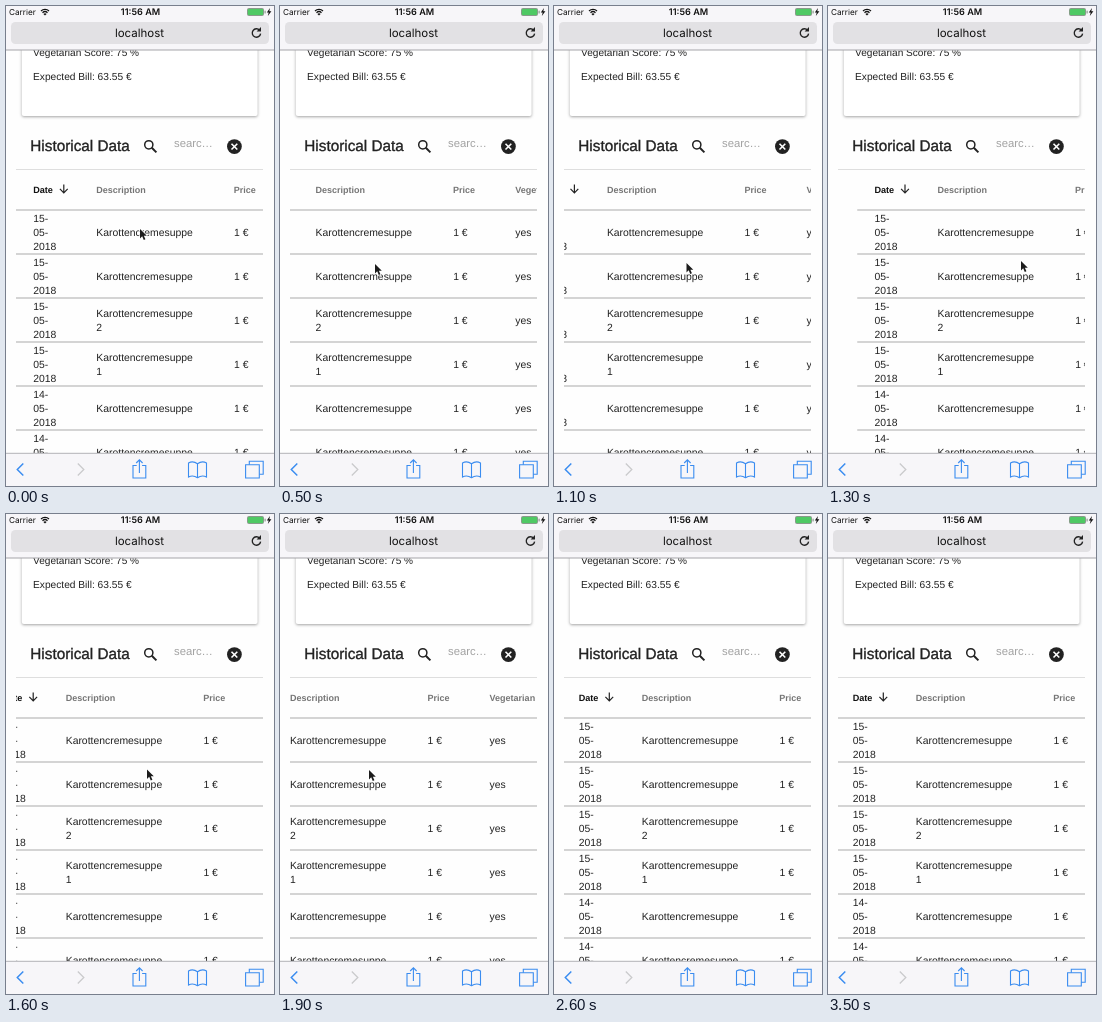
Write an HTML page with a canvas that moves like this. It is 268 px wide and 480 px high and loops after 3600 ms.

```html
<!DOCTYPE html>
<html lang="en">
<head>
<meta charset="utf-8">
<title>Scrolling table</title>
<style>
html, body { margin: 0; width: 100%; height: 100%; overflow: hidden; background: #fff; }
canvas { display: block; width: 100vw; height: 100vh; }
</style>
</head>
<body>
<canvas id="stage"></canvas>
<script>
const W = 268, H = 480, LOOP = 3600, STEP = 100;
const SANS = '"Liberation Sans", Arial, sans-serif';
const UI = 'Inter, Roboto, sans-serif';
const BLUE = '#3a8cf0', INK = '#222', BAR = '#f7f6f9';
const canvas = document.getElementById('stage');
const ctx = canvas.getContext('2d');
const dpr = window.devicePixelRatio || 1;
canvas.width = W * dpr;
canvas.height = H * dpr;
ctx.textRendering = 'geometricPrecision';

// Keys: time followed by values
const scrollKeys = [[0, 0], [900, -94], [1300, 19.2], [1900, -80.4], [2600, -2.5]];
const pointerKeys = [
  [0, 134, 223], [200, 138, 252], [500, 95, 258], [900, 72, 259],
  [1300, 193, 255], [1900, 89, 256], [2300, 168, 254], [2500, 285, 250]
];
const rows = [['15', ''], ['15', ''], ['15', '2'], ['15', '1'], ['14', ''], ['14', '']];

function at(keys, t) {
  const last = keys[keys.length - 1];
  if (t >= last[0]) return last.slice(1);
  const i = keys.findIndex(k => k[0] > t);
  const a = keys[i - 1], b = keys[i];
  const u = (t - a[0]) / (b[0] - a[0]);
  const e = u * u * (3 - 2 * u);
  return a.slice(1).map((v, n) => v + (b[n + 1] - v) * e);
}

function text(str, x, y, size, color = INK, weight = 400, family = SANS, align = 'left') {
  ctx.font = `${weight} ${size}px ${family}`;
  ctx.textAlign = align;
  ctx.fillStyle = color;
  ctx.fillText(str, x, y);
}

function rect(x, y, w, h, color) {
  ctx.fillStyle = color;
  ctx.fillRect(x, y, w, h);
}

function round(x, y, w, h, r, color) {
  ctx.beginPath();
  ctx.roundRect(x, y, w, h, r);
  ctx.fillStyle = color;
  ctx.fill();
}

function line(path, color, width = 1) {
  ctx.strokeStyle = color;
  ctx.lineWidth = width;
  ctx.stroke(new Path2D(path));
}

function shape(path, color) {
  ctx.fillStyle = color;
  ctx.fill(new Path2D(path));
}

function statusBar() {
  rect(0, 0, W, 44, BAR);
  rect(0, 43.5, W, 1, '#a6a6a9');
  text('Carrier', 3, 9, 8.2, '#111', 400, UI);
  shape('M39 9.6 L37.4 7.9 A2.3 2.3 0 0 1 40.6 7.9 Z', '#111');
  line('M36.5 6.7 A3.6 3.6 0 0 1 41.5 6.7 M35 5 A5.7 5.7 0 0 1 43 5', '#111', 1.2);
  text('11:56 AM', 134.5, 9.2, 9.1, '#111', 600, UI, 'center');
  round(241, 2, 17, 8, 2, '#8a9a8c');
  round(241.9, 2.9, 15.2, 6.2, 1.2, '#4fc964');
  round(258.5, 4.5, 1.2, 3, 0.6, '#8a9a8c');
  shape('M264 2 L260.8 6.5 H262.7 L261.8 10 L265.4 5.3 H263.3 Z', '#111');
  round(5, 16, 258, 22, 4.5, '#e2e1e4');
  text('localhost', 133.5, 31, 11.5, '#111', 400, UI, 'center');
  line('M253.6 24.2 A4.2 4.2 0 1 0 254.6 27.6', INK, 1.4);
  shape('M250.6 25.4 H255 V21 Z', INK);
}

function card() {
  ctx.save();
  ctx.shadowColor = 'rgba(0,0,0,.36)';
  ctx.shadowBlur = 3 * dpr;
  ctx.shadowOffsetY = 1 * dpr;
  round(15.8, 20, 235.8, 90, 2, '#fff');
  ctx.restore();
  text('Vegetarian Score: 75 %', 27, 50.3, 10.1);
  text('Expected Bill: 63.55 €', 27, 73.5, 10.2);
}

function tableBar() {
  text('Historical Data', 24.3, 145.3, 15.3, INK);
  ctx.strokeStyle = INK;
  ctx.lineWidth = 0.35;
  ctx.strokeText('Historical Data', 24.3, 145.3);
  ctx.beginPath();
  ctx.arc(142.8, 138.8, 4.1, 0, 7);
  ctx.lineWidth = 1.5;
  ctx.stroke();
  line('M145.8 141.8 L150.4 146.4', INK, 2);
  text('searc…', 168, 140.5, 11.3, '#a2a2a2');
  ctx.beginPath();
  ctx.arc(228.4, 140.6, 7.4, 0, 7);
  ctx.fillStyle = INK;
  ctx.fill();
  line('M225.5 137.7 L231.3 143.5 M231.3 137.7 L225.5 143.5', '#fff', 1.6);
  rect(10, 163, 247, 1, '#dedede');
}

function table(shift) {
  ctx.save();
  ctx.beginPath();
  ctx.rect(10, 164, 247, 284);
  ctx.clip();
  ctx.translate(shift, 0);
  text('Date', 27.2, 187.3, 9.1, '#111', 700);
  line('M57.8 178.6 V186.6 M53.9 182.9 L57.8 186.8 L61.7 182.9', INK, 1.2);
  text('Description', 90.3, 187.3, 9, '#757575', 700);
  text('Price', 227.8, 187.3, 9, '#757575', 700);
  text('Vegetarian', 290, 187.3, 9, '#757575', 700);
  rows.forEach(([day, extra], i) => {
    const top = 204 + 44 * i, base = top + 26;
    rect(10, top - 0.7, 400, 1.4, '#c4c4c4');
    [day + '-', '05-', '2018'].forEach((s, n) => text(s, 27.2, base + (n - 1) * 14.4, 10.4));
    const lines = extra ? ['Karottencremesuppe', extra] : ['Karottencremesuppe'];
    lines.forEach((s, n) => text(s, 90.3, base + (extra ? n * 14.4 - 7.2 : 0), 10.4));
    text('1 €', 228, base, 10.4);
    text('yes', 290, base, 10.4);
  });
  ctx.restore();
}

function toolBar() {
  rect(0, 447, W, 33, BAR);
  rect(0, 446.8, W, 1, '#b4b4b7');
  line('M17.3 457.5 L11.3 463.5 L17.3 469.5', BLUE, 1.5);
  line('M71.8 457.5 L77.8 463.5 L71.8 469.5', '#cacacc', 1.3);
  line('M130.7 459.5 H127 V472 H139.8 V459.5 H136.1', BLUE, 1.1);
  line('M133.4 467 V454 M130.2 457 L133.4 453.8 L136.6 457', BLUE, 1.1);
  line('M191.5 457.8 Q187 454.5 182.5 457 V471 Q187 468.7 191.5 471.7 ' +
       'Q196 468.7 200.5 471 V457 Q196 454.5 191.5 457.8 V471.7', BLUE, 1.1);
  line('M243.3 458.7 V455.3 H257.2 V468.3 H253.3', BLUE, 1.1);
  line('M239.6 458.7 H253.3 V472 H239.6 Z', BLUE, 1.1);
}

function pointer(x, y) {
  ctx.save();
  ctx.translate(x, y);
  ctx.scale(0.92, 0.92);
  const arrow = 'M0 0 V10.2 L2.4 8 L4.1 11.9 L5.9 11.1 L4.2 7.4 H7.4 Z';
  ctx.lineJoin = 'round';
  line(arrow, '#fff', 1.6);
  shape(arrow, '#1c1c1c');
  ctx.restore();
}

function draw(t) {
  ctx.setTransform(dpr, 0, 0, dpr, 0, 0);
  rect(0, 0, W, H, '#fefefe');
  card();
  tableBar();
  table(at(scrollKeys, t)[0]);
  statusBar();
  toolBar();
  pointer(...at(pointerKeys, t));
}

const start = performance.now();
function tick() {
  const t = (performance.now() - start) % LOOP;
  draw(Math.floor(t / STEP) * STEP);
  requestAnimationFrame(tick);
}
tick();
</script>
</body>
</html>
```
